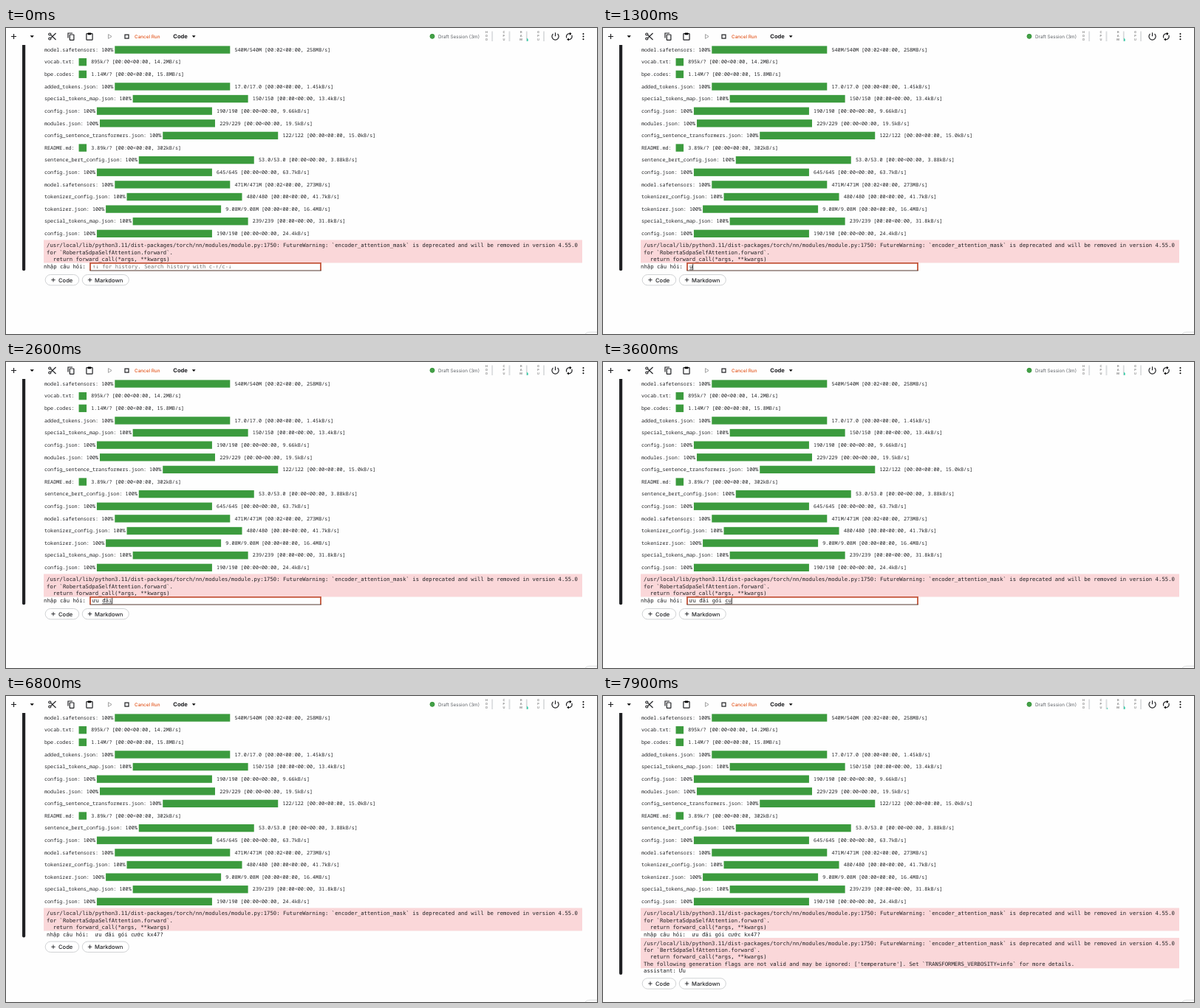
Recreate the animation shown at these times as an HTML page. Size 800x415 px, loop 8000 ms.

```html
<!DOCTYPE html>
<html lang="vi">
<head>
<meta charset="utf-8">
<title>Notebook session</title>
<style>
  html, body { margin: 0; width: 100%; height: 100%; overflow: hidden; background: #fefefe; }
  svg { display: block; }
  text { white-space: pre; text-rendering: geometricPrecision; fill: #202124; }
  .ui { font: 500 7.6px Inter, sans-serif; }
  .small { font: 500 6.35px Inter, sans-serif; }
  .meter { font: 600 4px Inter, sans-serif; fill: #777; text-anchor: middle; }
  .row { font: 6.77px "Noto Sans Mono", monospace; }
  .out { font: 7.29px "DejaVu Sans Mono", monospace; }
  .line { fill: none; stroke: #202124; stroke-width: 1.2; }
  .pink { fill: #fad7d9; }
</style>
</head>
<body>
<svg width="800" height="415" viewBox="0 0 800 415">
  <g id="toolbar">
    <path class="line" d="M7 11.5h7M10.5 8v7"/>
    <path d="M32.5 10.3h5.4l-2.7 2.8zM251.8 10.3h4.8l-2.4 2.6z"/>
    <g class="line">
      <circle cx="59.3" cy="8.5" r="1.5"/><circle cx="59.3" cy="14.5" r="1.5"/>
      <path d="M60.6 9.4L67.5 16M60.6 13.6L67.5 7"/>
      <path d="M84 13.5V7h6"/><rect x="86.3" y="9" width="5.6" height="7.4" rx=".6"/>
      <rect x="108.9" y="7.7" width="8.2" height="8.4" rx=".7"/>
      <rect x="161" y="9.1" width="5" height="5"/>
      <path d="M138.5 8.6v5.8l4.6-2.9z" stroke="#999" style="stroke:#999;stroke-width:.9"/>
      <path d="M740.6 8a4.6 4.6 0 1 0 6 0M743.6 6.2v5"/>
      <path d="M759 13.5a4 4 0 0 1 4.5-5.7M765.7 9.8a4 4 0 0 1-4.5 5.7"/>
    </g>
    <path d="M110.8 6.6h4.4v2.6h-4.4zM763 5.8l2.6 2-2.6 2.1zM761.8 13.4l-2.6 2.1 2.6 2z"/>
    <text class="small" x="174" y="14" style="fill:#e2571f">Cancel Run</text>
    <text class="ui" x="226.3" y="14.3" style="font-weight:700">Code</text>
    <circle id="dot" cx="577" cy="11.3" r="3" stroke="#39963d"/>
    <text class="small" x="585" y="13.6" style="font-weight:400;fill:#5f6368">Draft Session (3m)</text>
    <g id="meters"></g>
    <path d="M705 13.5v4.2h1.8v-2.5z" fill="#39cfaa"/>
    <path id="cpu" d="M682 17.8v-2.6l1.6 2.6z" fill="#39cfaa"/>
    <circle cx="781.5" cy="8" r="1"/><circle cx="781.5" cy="11.6" r="1"/><circle cx="781.5" cy="15.2" r="1"/>
  </g>
  <path id="side" fill="#202124"/>
  <g id="rows"></g>
  <rect class="pink" x="51" y="287.5" width="729" height="31"/>
  <g id="firstWarning"></g>

  <g id="entry">
    <text class="out" x="51" y="326.4">nhập câu hỏi:</text>
    <path d="M114 329V318.9H426V329" fill="none" stroke="#c4553a" stroke-width="1.8"/>
    <path d="M113.4 329H426.8" stroke="#54392f"/>
    <text id="hint" class="out" x="117" y="326.4" style="fill:#777">↑↓ for history. Search history with c-↑/c-↓</text>
    <text id="typed" class="out" x="117" y="326.4"></text>
    <path id="underline" stroke="#202124" stroke-width=".7"/>
    <path id="caret" stroke="#111" stroke-width=".8"/>
  </g>
  <text id="sent" class="out" x="55" y="325.6"></text>
  <g id="second">
    <rect class="pink" x="51" y="328" width="729" height="41.3"/>
    <g id="secondWarning"></g>
    <text id="answer" class="out" x="55" y="375.4"></text>
  </g>

  <g id="buttons">
    <g fill="#fff" stroke="#c4c7ca" stroke-width=".8">
      <rect x="53.2" y="-7.2" width="45.5" height="14.4" rx="7.2"/>
      <rect x="103.3" y="-7.2" width="63" height="14.4" rx="7.2"/>
    </g>
    <path class="line" style="stroke-width:.9" d="M61.3 0h5.4M64 -2.7v5.4M110.9 0h5.4M113.6 -2.7v5.4"/>
    <text class="ui" x="71" y="2.8">Code</text>
    <text class="ui" x="120" y="2.8">Markdown</text>
  </g>
  <path d="M784 415q2-2.6 6-2.6h10" fill="none" stroke="#d5d7d9" stroke-width=".8"/>
</svg>
<script>
const $ = id => document.getElementById(id);
const LOOP = 8000, CELL = 4.39, QUESTION = 'ưu đãi gói cước kx47?';

const downloads = `model.safetensors|540M/540M [00:02<00:00, 258MB/s]
vocab.txt|895k/? [00:00<00:00, 14.2MB/s]
bpe.codes|1.14M/? [00:00<00:00, 15.8MB/s]
added_tokens.json|17.0/17.0 [00:00<00:00, 1.45kB/s]
special_tokens_map.json|150/150 [00:00<00:00, 13.4kB/s]
config.json|190/190 [00:00<00:00, 9.66kB/s]
modules.json|229/229 [00:00<00:00, 19.5kB/s]
config_sentence_transformers.json|122/122 [00:00<00:00, 15.0kB/s]
README.md|3.89k/? [00:00<00:00, 302kB/s]
sentence_bert_config.json|53.0/53.0 [00:00<00:00, 3.88kB/s]
config.json|645/645 [00:00<00:00, 63.7kB/s]
model.safetensors|471M/471M [00:02<00:00, 273MB/s]
tokenizer_config.json|480/480 [00:00<00:00, 41.7kB/s]
tokenizer.json|9.08M/9.08M [00:00<00:00, 16.4MB/s]
special_tokens_map.json|239/239 [00:00<00:00, 31.8kB/s]
config.json|190/190 [00:00<00:00, 24.4kB/s]`.split('\n');

const escapeText = s => s.replace(/</g, '&lt;');
const label = (cls, x, y, s) => `<text class="${cls}" x="${x}" y="${y}">${escapeText(s)}</text>`;

$('rows').innerHTML = downloads.map((line, i) => {
  const [file, stats] = line.split('|');
  const unknown = stats.includes('/?');
  const name = file + (unknown ? ': ' : ': 100%');
  const y = 29.5 + i * 16.62, x = 53.9 + name.length * 4.06, w = unknown ? 10.5 : 156;
  return label('row', 52, y + 2.3, name) + label('row', x + w + 6.2, y + 2.3, stats) +
    `<rect x="${x}" y="${y - 5.1}" width="${w}" height="10.3" fill="#3c9b3e"/>`;
}).join('');

$('meters').innerHTML = ['HDD', 'CPU', 'RAM', 'GPU'].map((name, i) => {
  const x = 650.6 + i * 23.3;
  return [...name].map((c, j) => label('meter', x, 7 + j * 5, c)).join('') +
    `<rect x="${x + 6.7}" y="4.5" width="1.8" height="13.5" fill="#dadcde"/>`;
}).join('');

const warning = (y, cls, ...extra) => [
  '/usr/local/lib/python3.11/dist-packages/torch/nn/modules/module.py:1750: FutureWarning: ' +
    '`encoder_attention_mask` is deprecated and will be removed in version 4.55.0',
  `for \`${cls}.forward\`.`,
  '  return forward_call(*args, **kwargs)',
  ...extra
].map((s, i) => label('out', 55, y + i * 9.35, s)).join('');

$('firstWarning').innerHTML = warning(297.2, 'RobertaSdpaSelfAttention');
$('secondWarning').innerHTML = warning(337.6, 'BertSdpaSelfAttention',
  "The following generation flags are not valid and may be ignored: ['temperature']. " +
  'Set `TRANSFORMERS_VERBOSITY=info` for more details.');
$('sent').textContent = 'nhập câu hỏi:  ' + QUESTION;

// Keystrokes: [time, text in the field]
const keys = [
  [0, ''], [1300, 'u'], [1400, 'ư'], [1600, 'ưu'], [1800, 'ưu '],
  [2000, 'ưu d'], [2100, 'ưu đ'], [2300, 'ưu đa'], [2400, 'ưu đã'], [2600, 'ưu đãi'],
  [2800, 'ưu đãi '], [2900, 'ưu đãi g'], [3000, 'ưu đãi go'], [3100, 'ưu đãi gói'],
  [3300, 'ưu đãi gói '], [3400, 'ưu đãi gói c'], [3600, 'ưu đãi gói cu'], [3700, 'ưu đãi gói cư'],
  [4000, 'ưu đãi gói cướ'], [4100, 'ưu đãi gói cước'], [4300, 'ưu đãi gói cước '],
  [4700, 'ưu đãi gói cước k'], [4800, 'ưu đãi gói cước kx'],
  [5000, 'ưu đãi gói cước kx4'], [5100, 'ưu đãi gói cước kx47'], [6200, QUESTION]
];
const blinks = [100, 400, 700, 1100];

const show = (id, on) => $(id).style.display = on ? '' : 'none';

function draw(t) {
  const text = keys.findLast(k => k[0] <= t)[1];
  const sent = t >= 6400, second = t >= 7000;
  const wordStart = text.lastIndexOf(' ') + 1;
  const end = 117 + text.length * CELL;

  show('entry', !sent);
  show('hint', !text);
  $('typed').textContent = text;
  $('underline').setAttribute('d', `M${117 + wordStart * CELL} 327.8H${end}`);
  $('caret').setAttribute('d', `M${end + .3} 319.8V328.2`);
  show('caret', text || blinks.filter(b => b <= t).length % 2);

  show('sent', sent);
  show('second', second);
  $('answer').textContent = t < 7500 ? '' : t < 7900 ? 'assistant:' : 'assistant: Ưu';
  show('cpu', t >= 7500);
  $('dot').setAttribute('fill', t >= 1800 && t < 2000 ? '#226b2a' : '#43a047');

  const bottom = second ? 378 : sent ? 327.5 : 329.3;
  $('side').setAttribute('d', `M22 23H26.2V${bottom - 2}q0 2-2.1 2t-2.1-2z`);
  $('buttons').setAttribute('transform', `translate(0 ${second ? 390 : sent ? 340.2 : 341.7})`);
}

function tick() {
  draw(performance.now() % LOOP);
  requestAnimationFrame(tick);
}
tick();
</script>
</body>
</html>
```
